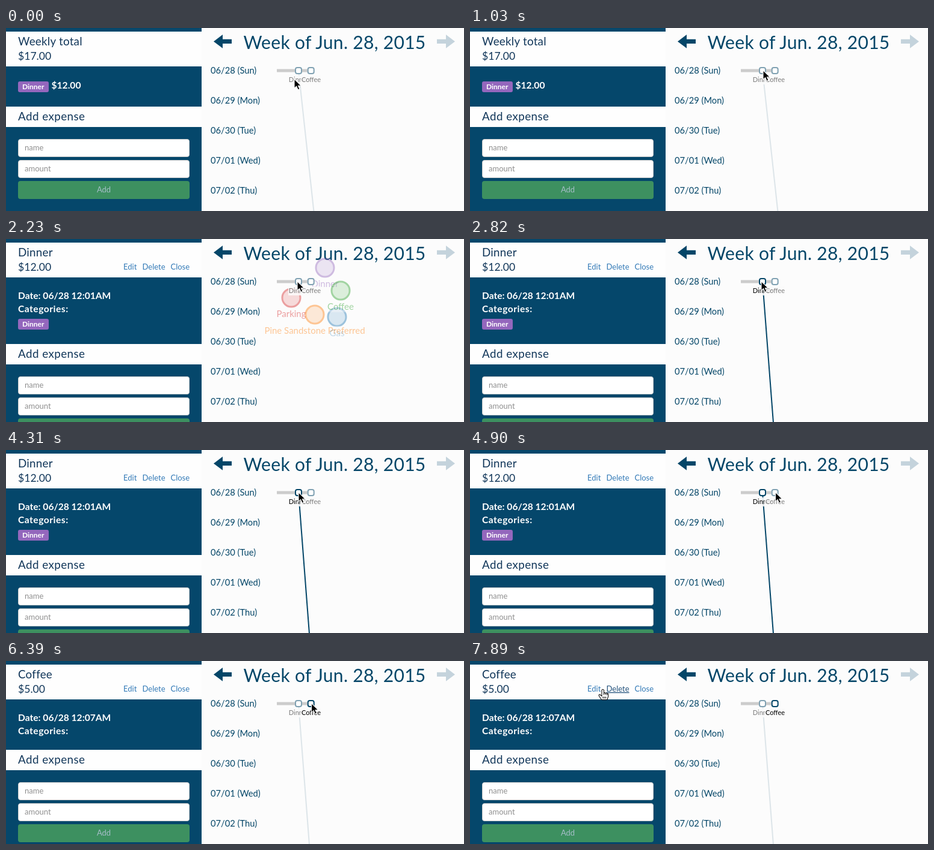
Animation, 761 px wide and 305 px high, one loop 8000 ms. Source, as an HTML page:

```html
<!DOCTYPE html>
<html lang="en">
<head>
<meta charset="utf-8">
<title>Weekly expenses</title>
<style>
  html, body { margin: 0; width: 100%; height: 100%; overflow: hidden; background: #fcfcfc; }
  svg { display: block; width: 761px; height: 305px; font-family: Lato, "Open Sans", sans-serif; }
  text { white-space: pre; }
  .title { font-size: 30px; letter-spacing: .3px; fill: #044668; text-anchor: middle; }
  .head { font-size: 18.8px; letter-spacing: .25px; fill: #12375a; }
  .sum { font-size: 17.6px; fill: #12375a; }
  .day { font-size: 14.7px; fill: #044668; }
  .bold { font-size: 15.6px; font-weight: 700; fill: #fff; }
  .tag { font-size: 12px; font-weight: 700; fill: #fff; }
  .hint { font-size: 13px; fill: #8f8f8f; }
  .link { font-size: 13px; fill: #337ab7; }
  .link.hover { fill: #23527c; text-decoration: underline; }
  .add { font-size: 13px; fill: #a7beca; text-anchor: middle; }
  .small { font-size: 11px; fill: #000; text-anchor: middle; }
  .cat { font-size: 15px; text-anchor: middle; }
</style>
</head>
<body>
<script>
const NAVY = '#044668', PANEL = '#05476b', PAPER = '#fcfcfc', LOOP = 8000;

function el(parent, tag, attrs = {}, text) {
  const node = document.createElementNS('http://www.w3.org/2000/svg', tag);
  for (const key in attrs) node.setAttribute(key, attrs[key]);
  if (text) node.textContent = text;
  return parent.appendChild(node);
}
const set = (node, attrs) => { for (const key in attrs) node.setAttribute(key, attrs[key]); };
const label = (parent, cls, x, y, text) => el(parent, 'text', { class: cls, x, y }, text);
const box = (parent, x, y, width, height, fill, more = {}) =>
  el(parent, 'rect', { x, y, width, height, fill, ...more });
const show = (node, on) => { node.style.display = on ? '' : 'none'; };
const mix = (a, b, p) => a + (b - a) * p;
const clamp = v => Math.min(1, Math.max(0, v));
const ease = p => p < .5 ? 4 * p ** 3 : 1 - 4 * (1 - p) ** 3;

const svg = el(document.body, 'svg', { width: 761, height: 305, viewBox: '0 0 761 305' });

// Sidebar
box(svg, 0, 0, 325, 305, PANEL);
box(svg, 0, 6, 325, 58, '#fefefe');

function badge(parent, y) {
  box(parent, 20, y, 51, 18, '#9467bd', { rx: 3 });
  label(parent, 'tag', 27, y + 12.8, 'Dinner');
}

const week = el(svg, 'g');
label(week, 'head', 20, 28.5, 'Weekly total');
label(week, 'sum', 20, 53, '$17.00');
badge(week, 89);
label(week, 'bold', 75.5, 101, '$12.00');

function detail(name, sum, date) {
  const g = el(svg, 'g');
  label(g, 'head', 20, 28.5, name);
  label(g, 'sum', 20, 53, sum);
  label(g, 'link', 195, 51, 'Edit');
  g.del = label(g, 'link', 226.5, 51, 'Delete');
  label(g, 'link', 273.5, 51, 'Close');
  label(g, 'bold', 20, 100, 'Date: ' + date);
  label(g, 'bold', 20, 122, 'Categories:').style.letterSpacing = '.5px';
  return g;
}
const dinner = detail('Dinner', '$12.00', '06/28 12:01AM');
badge(dinner, 133);
const coffee = detail('Coffee', '$5.00', '06/28 12:07AM');

const form = el(svg, 'g');
box(form, 0, 131, 325, 34, '#fefefe');
label(form, 'head', 20, 153.7, 'Add expense').style.letterSpacing = '.45px';
['name', 'amount'].forEach((text, i) => {
  box(form, 20.5, 185.5 + 35 * i, 284, 29, '#fff', { rx: 3.5, stroke: '#ccc' });
  label(form, 'hint', 31, 204 + 35 * i, text);
});
box(form, 20, 255, 285, 30, '#3d9060', { rx: 4 });
label(form, 'add', 162.5, 274, 'Add');

// Calendar
const arrow = 'M345 22.4L360 11V18.8H375V26H360V33.8Z';
el(svg, 'path', { d: arrow, fill: NAVY });
el(svg, 'path', { d: arrow, fill: '#c4d3dc', transform: 'translate(1091)scale(-1 1)' });
label(svg, 'title', 546, 34.5, 'Week of Jun. 28, 2015');
['06/28 (Sun)', '06/29 (Mon)', '06/30 (Tue)', '07/01 (Wed)', '07/02 (Thu)']
  .forEach((text, i) => label(svg, 'day', 340, 76 + 50 * i, text));

box(svg, 450, 68.5, 57, 5, '#ccc');
const link = el(svg, 'line', { x1: 486, y1: 71, stroke: NAVY, 'stroke-width': 2 });

// Categories: name, colour, first start, second start, end
const cats = [
  ['Dinner', '#9467bd', [530, 48], [523, 44], [522, 541]],
  ['Parking', '#d62728', [474, 98], [478, 107], [470, 590]],
  ['Gas', '#1f77b4', [550, 130], [515, 134], [508, 640]],
  ['Coffee', '#2ca02c', [556, 86], [559, 76], [580, 570]],
  ['Pine Sandstone Preferred', '#ff7f0e', [513, 126], [557.5, 121], [600, 610]]
].map(([name, color, ...spots]) => {
  const g = el(svg, 'g', { opacity: .43 });
  el(g, 'circle', { r: 15, fill: PAPER, 'fill-opacity': .6 });
  el(g, 'circle', { r: 15, fill: color, 'fill-opacity': .36, stroke: color, 'stroke-width': 3 });
  const width = name.length * 7.1;
  box(g, -width / 2, 19, width, 17, PAPER, { opacity: .85 });
  el(g, 'text', { class: 'cat', y: 32, fill: color }, name);
  return { g, spots };
});

// The label's backing stays solid while the node itself fades
function expense(x, name) {
  box(svg, x - 17, 79, 34, 15, PAPER, { opacity: .85 });
  box(svg, x - 6, 65, 12, 12, '#fff', { rx: 4 });
  const g = el(svg, 'g');
  box(g, x - 5, 66, 10, 10, '#fff', { rx: 3, stroke: NAVY, 'stroke-width': 2 });
  label(g, 'small', x + .3, 90, name);
  return g;
}
const dinnerNode = expense(486, 'Dinner');
const coffeeNode = expense(506.7, 'Coffee');

// Pointers
const pointer = el(svg, 'path', {
  d: 'M0 0V15.5L3.6 12.2L6.2 18L9 16.8L6.5 11.2H11.3Z',
  fill: '#000', stroke: '#fff', 'stroke-width': 1.1
});
const hand = el(svg, 'path', {
  d: 'M-2 1Q0-1.5 1.5 1V6Q3 4.6 4.2 6.2Q5.6 5 6.8 6.8Q8.8 6.2 8.8 8.5V11L7 17H-2.5L-6.8 10.5Q-7.4 7.8-5 8.5L-2 11Z' +
     'M1.5 6V9M4.3 6.5V9M6.8 7V9.5M0 12V15M2.3 12V15M4.6 12V15',
  fill: '#fff', stroke: '#111', 'stroke-width': 1.1, 'stroke-linejoin': 'round'
});

// Time, x, y
const moves = [
  [0, 479, 85], [150, 487, 77], [290, 492, 71], [590, 490, 71], [730, 488, 71],
  [1030, 487, 70.5], [1180, 486, 70.5], [1630, 487, 71.5], [2080, 484, 70.5],
  [4310, 486, 70.5], [4460, 491, 71], [4610, 498, 71], [4750, 504, 70.5], [4900, 507.5, 70.5],
  [7440, 440, 64], [7590, 318, 50], [7740, 246, 47], [7890, 221, 47.5]
];
// Times at which the graph redraws
const beats = [2230, 2380, 2520, 2670, 2820, 5800, 5940, 6090, 6240, 6390];
const OPEN = beats[0], SWAP = beats[5];

function render(t) {
  const [, x, y] = moves.findLast(m => m[0] <= t);
  const overLink = t >= 7740;
  show(pointer, !overLink);
  show(hand, overLink);
  set(overLink ? hand : pointer, { transform: `translate(${x} ${y})` });

  const second = t >= SWAP, opened = t >= OPEN;
  show(week, !opened);
  show(dinner, opened && !second);
  show(coffee, second);
  coffee.del.classList.toggle('hover', overLink);
  set(form, { transform: `translate(0 ${second ? 17 : opened ? 44 : 0})` });

  const beat = beats.findLast(b => b <= t) ?? 0;
  const p = opened ? ease(clamp((beat - (second ? SWAP : OPEN)) / 500)) : 1;
  cats.forEach(({ g, spots }) => {
    const from = spots[second ? 1 : 0], to = spots[2];
    const at = [0, 1].map(i => mix(from[i], to[i], p));
    set(g, { transform: `translate(${at})` });
    show(g, opened && p < 1);
    if (g === cats[0].g) set(link, { x2: opened ? at[0] : 537, y2: at[1] });
  });
  set(link, { opacity: opened ? (second ? .12 : 1) * p : .12 });
  set(dinnerNode, { opacity: second ? mix(1, .5, p) : opened ? mix(.5, 1, p) : .5 });
  set(coffeeNode, { opacity: second ? mix(.5, 1, p) : .5 });
}

const start = performance.now();
function tick() {
  render((performance.now() - start) % LOOP);
  requestAnimationFrame(tick);
}
tick();
</script>
</body>
</html>
```
